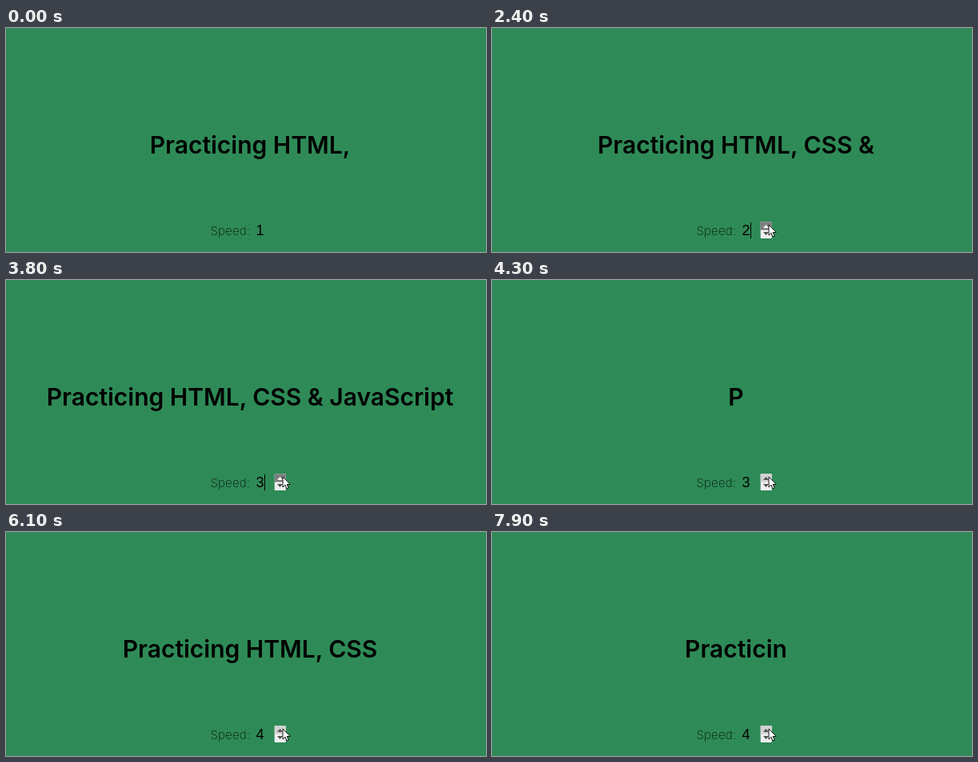
Recreate the animation shown at these times as an HTML page. Size 600x280 px, loop 8000 ms.

```html
<!DOCTYPE html>
<html lang="en">
<head>
<meta charset="utf-8">
<title>Typing text</title>
<style>
  html, body { margin: 0; height: 100%; overflow: hidden; background: #2e8b57; }
  svg { display: block; width: 100%; height: 100%; }
  #line { font: 600 30px Inter, sans-serif; text-anchor: middle; }
  #label { font: 200 15px Inter, sans-serif; letter-spacing: .2px; fill-opacity: .85; }
  #digit { font: 18px "Liberation Sans", Arial, sans-serif; }
</style>
</head>
<body>
<svg viewBox="0 0 600 280">
  <text id="line" x="305" y="156.5"></text>
  <text id="label" x="255.5" y="259">Speed:</text>
  <text id="digit" x="312.5" y="259"></text>
  <path id="caret" d="M323.5 243V263" stroke="#000"/>
  <g id="spinner">
    <path d="M335.7 242.3h14v20.7h-14z" fill="#efefef"/>
    <path id="up" d="M335.7 242.3h14v10.2h-14z"/>
    <path id="upArrow" d="M339 250l3.5-4 3.5 4z"/>
    <path d="M339 255l3.5 4 3.5-4z" fill="#505050"/>
  </g>
  <path id="mouse" d="M0 0V13L3 10.2 5 15 7.2 14 5.2 9.5H9.2Z" fill="#fff" stroke="#000" stroke-width=".9"/>
</svg>
<script>
const LOOP = 8000;
const TEXT = "Practicing HTML, CSS & JavaScript...";
const $ = id => document.getElementById(id);

// Typing stretches: start time, letters typed by then, delay per letter
const typing = [[-6, 16, 301], [2402, 24, 151], [3915, 34, 101], [5531, 50, 76]];
const clicks = [2380, 3780, 5480];
const path = [[600, 568, 281], [700, 568, 263], [1400, 440, 264], [1500, 440, 264], [2200, 346, 246]];

function lettersAt(t) {
  const [start, count, delay] = typing.findLast(s => t >= s[0]);
  const total = count + Math.floor((t - start) / delay);
  return (total - 1) % TEXT.length + 1;
}

function mouseAt(t) {
  const i = path.findIndex(p => t < p[0]);
  if (i < 0) return path.at(-1).slice(1);
  if (i === 0) return path[0].slice(1);
  const [t0, x0, y0] = path[i - 1], [t1, x1, y1] = path[i];
  const k = (t - t0) / (t1 - t0);
  return [x0 + (x1 - x0) * k, y0 + (y1 - y0) * k];
}

const show = (id, on) => $(id).setAttribute("visibility", on ? "visible" : "hidden");

function draw(t) {
  $("line").textContent = TEXT.slice(0, lettersAt(t)).trimEnd();
  $("digit").textContent = 1 + clicks.filter(c => t >= c).length;

  const [x, y] = mouseAt(t);
  $("mouse").setAttribute("transform", `translate(${x} ${y})`);
  show("spinner", x < 356);
  show("caret", t >= clicks[0] && (t - clicks[0]) % 1000 < 500);

  const pressed = clicks.some(c => t >= c && t < c + 110);
  $("up").setAttribute("fill", pressed ? "#7d7d7d" : "#d2d2d2");
  $("upArrow").setAttribute("fill", pressed ? "#fff" : "#505050");
}

const begin = performance.now();
function tick() {
  draw((performance.now() - begin) % LOOP);
  requestAnimationFrame(tick);
}
tick();
</script>
</body>
</html>
```
